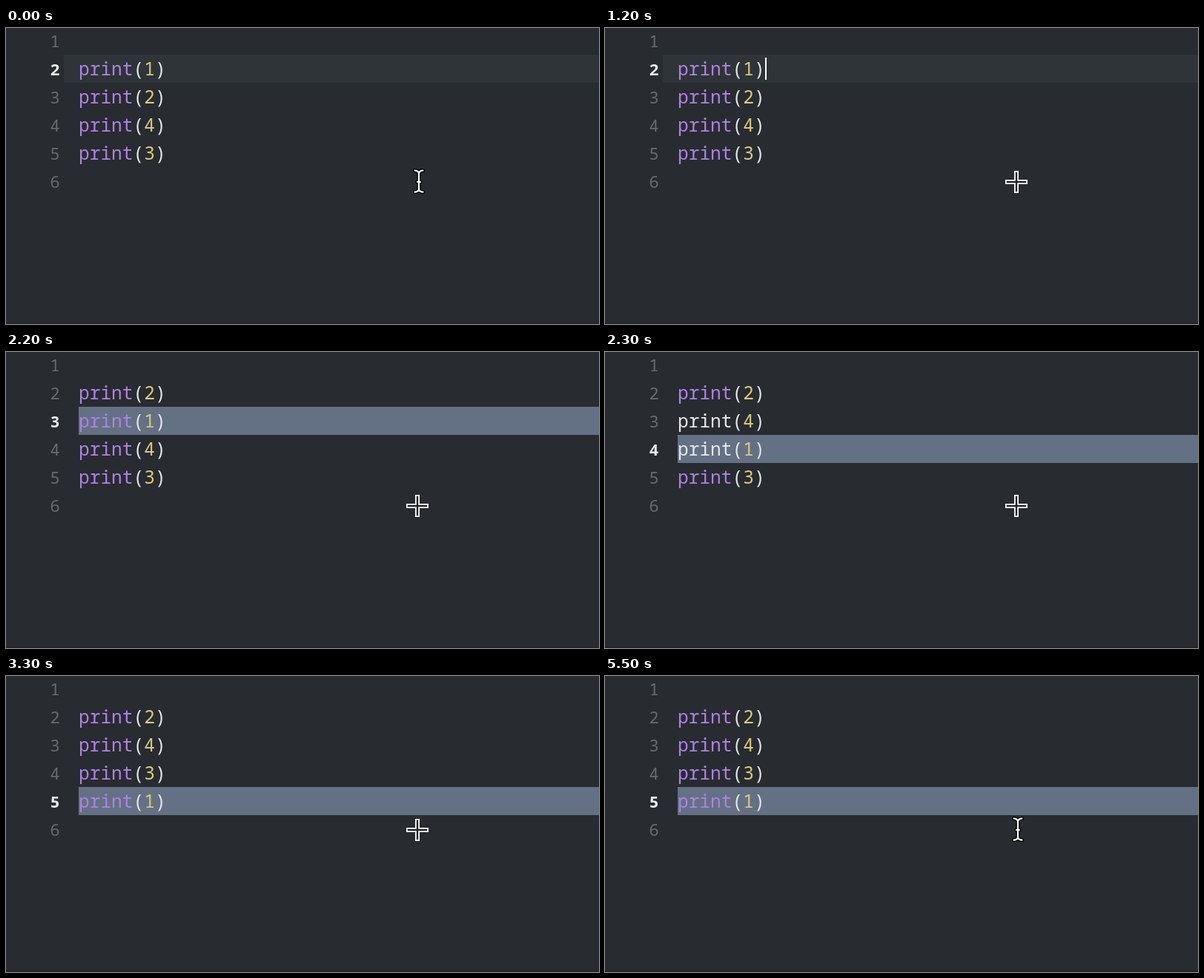
Animation of 800x400 px, one loop 5.6 s. Source, as an HTML page:

```html
<!DOCTYPE html>
<html lang="en">
<head>
<meta charset="utf-8">
<title>Moving a line</title>
<style>
  html, body { margin: 0; width: 100%; height: 100%; overflow: hidden; background: #282b30; }
  svg { display: block; width: 800px; height: 400px; }
  text { font-family: "Noto Sans Mono", "DejaVu Sans Mono", monospace; white-space: pre; }
  .code { font-size: 24.5px; font-weight: 500; fill: #e6e7e9; }
  .num { font-size: 22px; font-weight: 500; fill: #686b70; text-anchor: middle; }
  .num.on { font-weight: 600; fill: #ededed; }
  .fn { fill: #af80e6; }
  .fn.plain { fill: #e6e7e9; }
  .arg { fill: #d9ca7e; }
</style>
</head>
<body>
<svg id="stage" viewBox="0 0 800 400">
  <rect width="800" height="400" fill="#282b30"/>
  <rect y="398" width="800" height="2" fill="#222529"/>
  <rect id="bar" height="38"/>
  <g id="lines"></g>
  <rect id="caret" x="216" y="40" width="2" height="30" fill="#fff"/>
  <g id="beam" fill="none" stroke-linecap="round" stroke-linejoin="round">
    <path id="beamEdge" stroke="#000" stroke-width="5"/>
    <path id="beamCore" stroke="#fff" stroke-width="2.2"/>
  </g>
  <path id="cross" fill="#202327" stroke="#fff" stroke-width="1.8"
    d="M552.9 193.9h4.2v12h12v4.2h-12v12h-4.2v-12h-12v-4.2h12z"/>
</svg>
<script>
const LOOP = 5600, PITCH = 38;
const NS = "http://www.w3.org/2000/svg";
const $ = id => document.getElementById(id);

// Order of the printed values and the active row from each moment on
const STATES = [
  { at: 0, order: "1243", row: 2, selected: false },
  { at: 1800, order: "2143", row: 3, selected: true },
  { at: 2300, order: "2413", row: 4, selected: true },
  { at: 3300, order: "2431", row: 5, selected: true }
];
const PLAIN = { from: 2300, to: 2400, rows: [3, 4] };
const CROSS = { from: 800, to: 4000 };

const within = (t, span) => t >= span.from && t < span.to;
const clamp = v => Math.max(0, Math.min(1, v));

function add(parent, tag, attrs, content = "") {
  const el = document.createElementNS(NS, tag);
  for (const key in attrs) el.setAttribute(key, attrs[key]);
  el.textContent = content;
  parent.appendChild(el);
  return el;
}

const beamPath = "M551.5 192.5q4 0 5.5 3.2q1.5-3.2 5.5-3.2M557 195.7v22.8" +
  "M551.5 221.7q4 0 5.5-3.2q1.5 3.2 5.5 3.2M555 208h4";
$("beamEdge").setAttribute("d", beamPath);
$("beamCore").setAttribute("d", beamPath);

const rows = [];
for (let n = 1; n <= 6; n++) {
  const y = 26 + (n - 1) * PITCH;
  const row = { n, num: add($("lines"), "text", { x: 66, y, class: "num" }, n) };
  if (n > 1 && n < 6) {
    const code = add($("lines"), "text", { x: 98, y, class: "code" });
    row.fn = add(code, "tspan", { class: "fn" }, "print");
    add(code, "tspan", {}, "(");
    row.arg = add(code, "tspan", { class: "arg" });
    add(code, "tspan", {}, ")");
  }
  rows.push(row);
}

// Smooth blink with a one second period
function caretAlpha(t) {
  const p = t % 1000;
  return Math.min(clamp(p / 200), clamp((700 - p) / 250));
}

function draw(t) {
  const state = STATES.filter(s => t >= s.at).pop();
  const left = state.selected ? 98 : 78;
  const bar = $("bar");
  bar.setAttribute("x", left);
  bar.setAttribute("y", (state.row - 1) * PITCH - 2);
  bar.setAttribute("width", 800 - left);
  bar.setAttribute("fill", state.selected ? "#647184" : "#2f3438");

  for (const row of rows) {
    row.num.classList.toggle("on", row.n === state.row);
    if (!row.fn) continue;
    row.arg.textContent = state.order[row.n - 2];
    row.fn.classList.toggle("plain", within(t, PLAIN) && PLAIN.rows.includes(row.n));
  }

  $("caret").setAttribute("opacity", state.selected ? 0 : caretAlpha(t));
  const crossOn = within(t, CROSS);
  $("cross").setAttribute("visibility", crossOn ? "visible" : "hidden");
  $("beam").setAttribute("visibility", crossOn ? "hidden" : "visible");
}

let start = null;
function tick(now) {
  if (start === null) start = now;
  draw((now - start) % LOOP);
  requestAnimationFrame(tick);
}
draw(0);
requestAnimationFrame(tick);
</script>
</body>
</html>
```
